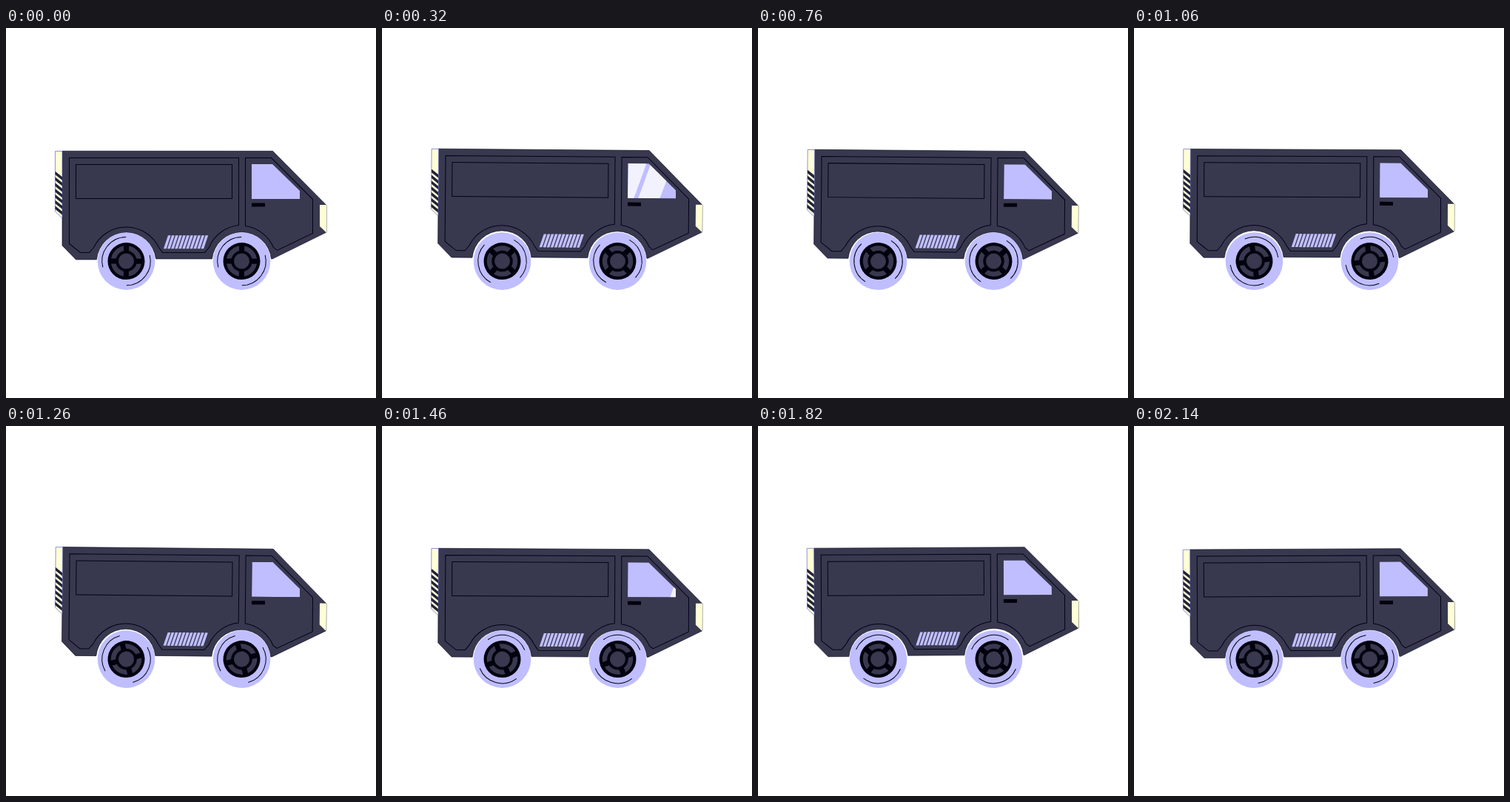
An HTML page that plays this animation: 500x500 px, repeating every 2160 ms.

```html
<!DOCTYPE html>
<html lang="en">
<head>
<meta charset="utf-8">
<title>Van</title>
<style>
html, body { margin: 0; width: 100%; height: 100%; overflow: hidden; background: #fff; }
svg { display: block; width: 100vw; height: 100vh; }
.line { fill: none; stroke: #02021a; stroke-width: 1; }
.body { fill: #38384f; }
.dark { fill: #02020f; }
.lilac { fill: #c0beff; }
.lamp { fill: #ffffd6; }
</style>
</head>
<body>
<svg viewBox="0 0 500 500">
  <defs>
    <clipPath id="pane"><path d="M332 184H360L397 220V231H332Z"/></clipPath>
    <clipPath id="tail"><path d="M66.5 194H76V257L66.5 248Z"/></clipPath>
    <g id="wheel">
      <circle class="lilac" r="38.8"/>
      <path class="line" id="arcs"/>
      <circle class="dark" r="25"/>
      <circle r="17.5" fill="none" stroke="#38384f" stroke-width="6.5"/>
      <path d="M-22 0H22M0-22V22" stroke="#02020f" stroke-width="7"/>
      <circle class="body" r="10.5"/>
    </g>
  </defs>
  <g id="van">
    <path class="body" stroke="#02021a" stroke-width=".6"
      d="M76 166.300H360.500L433 239.500V276L360 312H358.500A40.200 40.200 0 0 0 278.500 312H202.500A40.200 40.200 0 0 0 122.500 313H94.500L76 294Z"/>
    <path class="lamp" stroke="#6464c8" stroke-width=".7" d="M66.500 166.500H76V257L66.500 248Z"/>
    <path id="bars" clip-path="url(#tail)" stroke="#22223a" stroke-width="3.500" fill="none"/>
    <path class="lamp" d="M424 239H433V276.500L424 268Z"/>
    <g class="line" transform="translate(.5 .5)">
      <path d="M85 175H314V266A49 49 0 0 0 274 296L268 303H211L206 296A49 49 0 0 0 118 296L112 303H100L85 291Z"/>
      <path d="M323 175H358L414 231V277L366 300L361 296A49 49 0 0 0 323 267Z"/>
      <path d="M94 184H305V230H94Z"/>
    </g>
    <g clip-path="url(#pane)">
      <rect class="lilac" x="330" y="180" width="70" height="54"/>
      <path id="glint" fill="#f2f2ff" d="M0 231H26L43 183H17ZM32 231H61L79 183H49Z"/>
    </g>
    <rect class="dark" x="332" y="236.500" width="18" height="5"/>
    <path id="vent" class="lilac"/>
  </g>
  <g id="rear"><use href="#wheel"/></g>
  <g id="front"><use href="#wheel"/></g>
</svg>
<script>
const $ = id => document.getElementById(id);
const set = (id, name, value) => $(id).setAttribute(name, value);
const repeat = (n, f) => Array.from({ length: n }, (_, i) => f(i)).join('');
const LOOP = 2160, BOUNCE = 240, SHINE = 1080;

function arc(from, to, r = 32.7) {
  const point = deg => {
    const a = deg * Math.PI / 180;
    return `${r * Math.cos(a)} ${r * Math.sin(a)}`;
  };
  return `M${point(from)}A${r} ${r} 0 0 1 ${point(to)}`;
}

set('arcs', 'd', arc(-15, 89) + arc(165, 269));
set('bars', 'd', repeat(7, i => `M64 ${194 + i * 7.8}l15 12`));
set('vent', 'd', repeat(11, i => `M${213 + i * 5.05} 298.300h3.700l6-18h-3.700Z`));

function draw(now) {
  const t = now % LOOP;
  const phase = t / BOUNCE * 2 * Math.PI;
  const lift = -1.1 * (1 - Math.cos(phase));
  set('van', 'transform', `translate(0 ${lift}) rotate(${0.55 * Math.sin(phase)} 249 240)`);

  // Two and a half turns per loop; the wheel repeats every half turn.
  const turn = t / LOOP * 900;
  set('rear', 'transform', `translate(162.500 315.100) rotate(${turn})`);
  set('front', 'transform', `translate(318.500 315.100) rotate(${turn})`);

  set('glint', 'transform', `translate(${313 + 1.25 * (t % SHINE - 320)} 0)`);
}

const start = performance.now();
function tick() {
  draw(performance.now() - start);
  requestAnimationFrame(tick);
}
tick();
</script>
</body>
</html>
```
